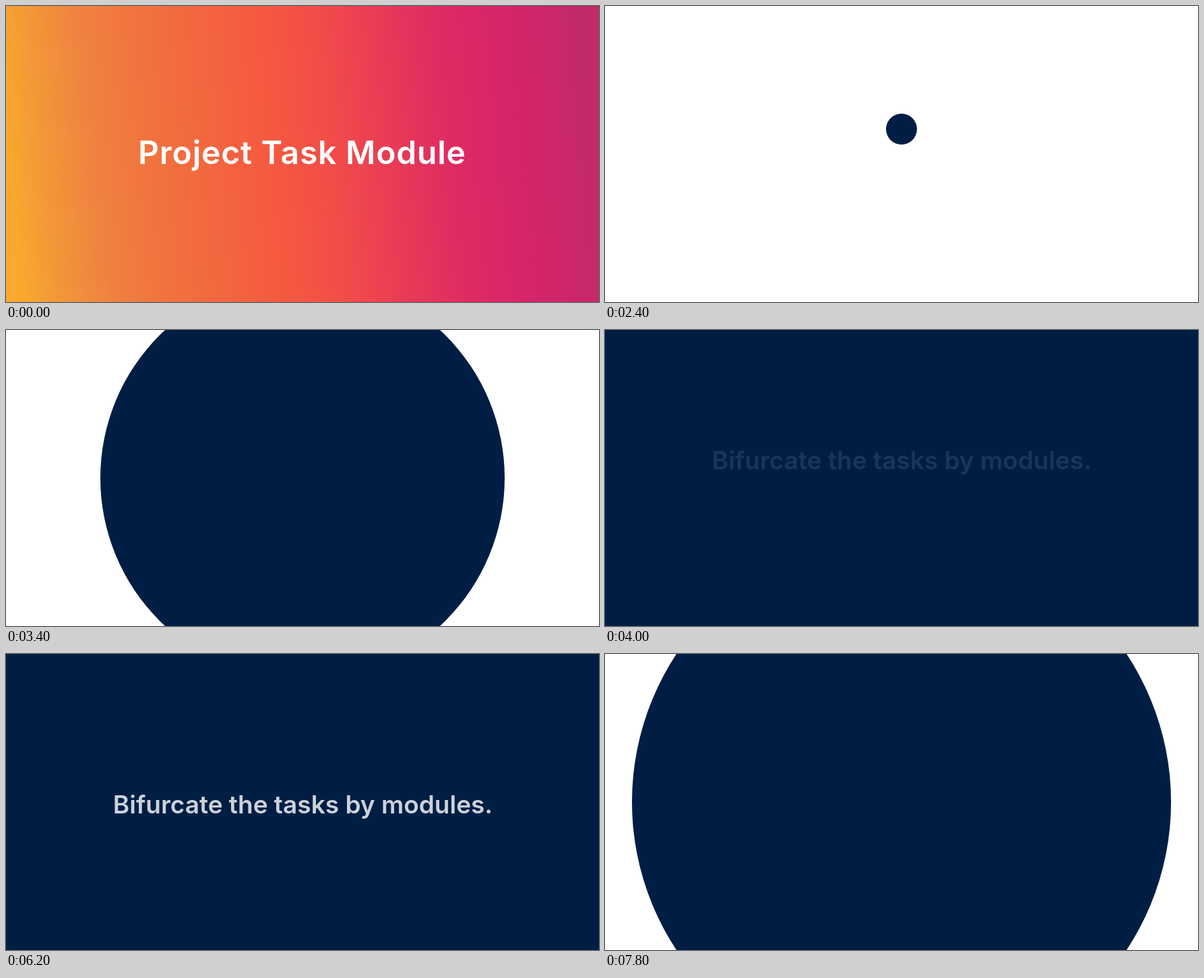
An HTML page for the animation above (8 s loop, 880 by 440 pixels).

```html
<!DOCTYPE html>
<html lang="en">
<head>
<meta charset="utf-8">
<title>Project Task Module</title>
<style>
  html, body { margin: 0; width: 100%; height: 100%; overflow: hidden; background: #fff; }
  svg { display: block; width: 100%; height: 100%; }
  text { font-family: Inter, "Open Sans", sans-serif; font-weight: 600; fill: #fff; text-anchor: middle; }
  #title text { font-size: 48px; letter-spacing: .8px; }
  #line { font-size: 37px; }
</style>
</head>
<body>
<svg viewBox="0 0 880 440">
  <defs>
    <linearGradient id="sunset" gradientUnits="userSpaceOnUse" x1="0" y1="220" x2="871" y2="133">
      <stop offset="0" stop-color="#f9a92e"/>
      <stop offset=".06" stop-color="#f39837"/>
      <stop offset=".15" stop-color="#ef8240"/>
      <stop offset=".25" stop-color="#f1723f"/>
      <stop offset=".45" stop-color="#f5593f"/>
      <stop offset=".55" stop-color="#f24c49"/>
      <stop offset=".65" stop-color="#e93b56"/>
      <stop offset=".75" stop-color="#df2b62"/>
      <stop offset=".86" stop-color="#d6246a"/>
      <stop offset=".92" stop-color="#cf266a"/>
      <stop offset="1" stop-color="#c02a6b"/>
    </linearGradient>
  </defs>
  <g id="title">
    <rect width="880" height="440" fill="url(#sunset)"/>
    <text x="439.4" y="235">Project Task Module</text>
  </g>
  <circle id="dot" cx="440" fill="#001e44"/>
  <text id="line" x="440.5" y="207">Bifurcate the tasks by modules.</text>
</svg>
<script>
  const LOOP = 8000;
  const GROWTH = [50, 117, 208, 300, 400, 500];
  const title = document.getElementById('title');
  const dot = document.getElementById('dot');
  const line = document.getElementById('line');

  // Motion advances in held steps: 300 ms each at first, then 200 ms.
  function stepAt(t) {
    if (t < 600) return -1;
    if (t < 1200) return Math.floor((t - 600) / 300);
    return 2 + Math.floor((t - 1200) / 200);
  }

  function radius(n) {
    if (n < 0) return 0;
    if (n < 10) return 15 + n;
    if (n < 16) return GROWTH[n - 10];
    return n < 35 ? 500 : 400;
  }

  // Steady fall that gathers speed, stopping at the centre.
  function dropY(n) {
    if (n > 9) return 220;
    return 1 + 16.5 * n + 1.389 * Math.max(0, n - 2) ** 2;
  }

  function draw(t) {
    const n = stepAt(t);
    title.style.display = n < 2 ? '' : 'none';
    dot.setAttribute('r', radius(n));
    dot.setAttribute('cy', dropY(n));

    const sink = Math.max(0, n - 25);
    const alpha = Math.min(n - 15, 35 - n, 10) / 10;
    line.style.opacity = Math.max(0, alpha);
    line.setAttribute('y', 207 + 14.17 * sink + 0.417 * sink * sink);
  }

  const start = performance.now();
  function tick() {
    draw((performance.now() - start) % LOOP);
    requestAnimationFrame(tick);
  }
  tick();
</script>
</body>
</html>
```
